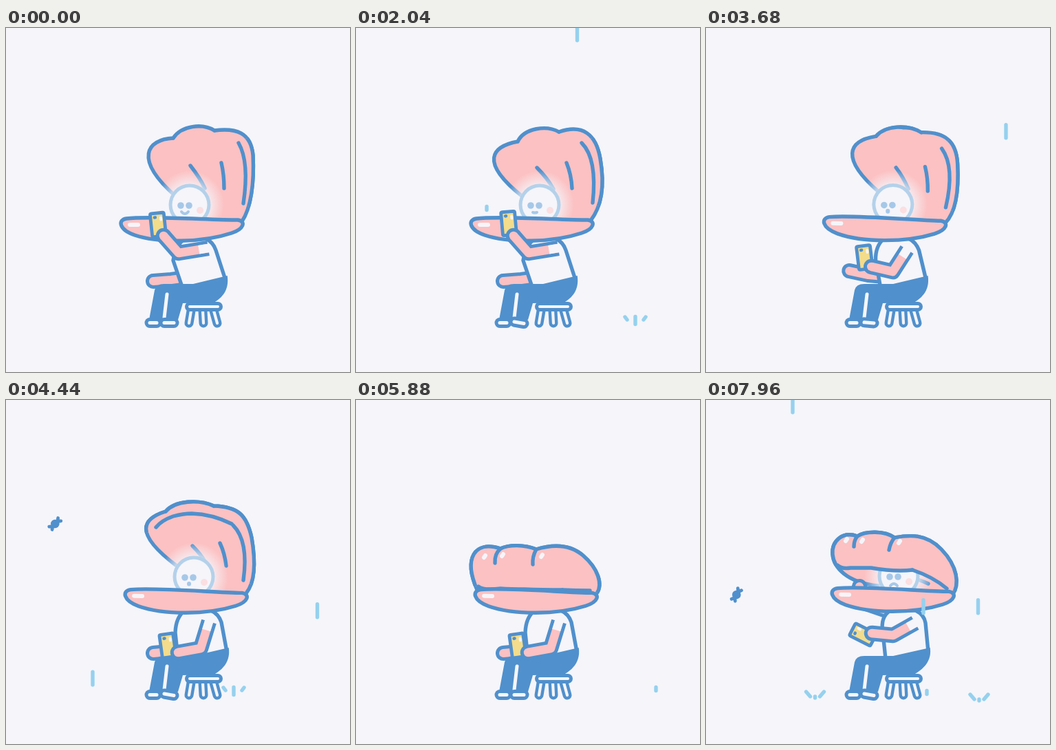
An HTML page with a canvas for the animation above (8 s loop, 500 px wide and 500 px high).

```html
<!DOCTYPE html>
<html lang="en">
<head>
<meta charset="utf-8">
<title>Clam on a stool</title>
<style>
  html, body { margin: 0; height: 100%; overflow: hidden; background: #f5f5fa; }
  canvas { display: block; width: 100vw; height: 100vh; }
</style>
</head>
<body>
<canvas id="stage" width="500" height="500"></canvas>
<script>
const ctx = document.getElementById('stage').getContext('2d');
const LOOP = 8000;
const WHITE = '#f5f5fa', BLUE = '#5090cc', PINK = '#fcc1c2', YELLOW = '#f3dc8b', RAIN = '#95d1ee';
const FACE_LINE = '#b4d1ea', FACE_DARK = '#a6c8e8';

// Poses: every value is a string whose numbers are blended between keys.
const reading = {
  outline: 'M246 244 C185 190 205 162 243 160 C255 142 285 138 303 149 C335 145 356 152 359 185 C361 225 356 262 343 281',
  rimTop: 'M190 170 Q215 135 243 140 Q270 120 300 130 Q340 125 375 145',
  rimSide: 'M338 167 Q354 195 345 255',
  folds: 'M268 200 Q282 218 289 233 M313 196 Q317 213 317 233',
  creases: 'M243 160 Q243 160 243 160 M303 149 Q303 149 303 149',
  shine: 'M205 130 L204 132 M235 125 L234 127 M300 125 L299 127',
  lower: '0 0 0', face: '267 257', mouth: 'M255 267 Q260 273 265 267', mouthWidth: '4', angry: '0',
  torso: 'M256 376 L243 338 Q247 312 262 306 L290 306 Q301 311 305 323 L319 366',
  arm: 'M294 320 L251 327 L229 302', backArm: 'M255 364 L240 366 L214 368',
  phone: '221 286 -6', tap: '0'
};
const swayed = {
  ...reading,
  outline: 'M242 245 C178 194 198 172 235 165 C245 145 277 141 295 151 C330 139 349 155 355 190 C361 225 358 258 341 280',
  rimSide: 'M328 167 Q351 190 344 254',
  folds: 'M263 203 Q278 218 287 234 M306 196 Q313 213 314 233',
  creases: 'M235 165 Q235 165 235 165 M295 151 Q295 151 295 151',
  mouth: 'M257 268 Q260 269 263 268', phone: '222 284 -5', tap: '1'
};
const lowering = {
  ...reading,
  outline: 'M252 235 C205 188 210 158 258 154 C272 137 305 138 321 150 C355 148 374 162 372 195 C371 235 364 270 347 285',
  rimSide: 'M352 170 Q369 200 351 260',
  folds: 'M280 196 Q290 212 297 232 M324 197 Q326 215 324 234',
  creases: 'M258 154 Q258 154 258 154 M321 150 Q321 150 321 150',
  lower: '3 -1 1.5', face: '271 256', mouth: 'M263 265 Q263 266 263 266', mouthWidth: '6',
  torso: 'M256 376 L247 338 Q245 318 258 306 L292 306 Q302 311 307 323 L319 366',
  arm: 'M290 322 L263 349 L233 332', backArm: 'M255 358 L236 354 L204 342',
  phone: '227 316 -6'
};
const waiting = {
  ...lowering,
  outline: 'M248 241 C183 192 200 172 232 162 C246 146 280 144 302 154 C338 155 350 168 357 200 C363 235 362 265 349 281',
  rimTop: 'M218 185 Q226 175 243 169 Q258 165 270 165 Q300 166 328 180',
  rimSide: 'M330 182 Q353 205 345 262',
  folds: 'M271 212 Q283 224 290 236 M311 208 Q318 223 320 241',
  creases: 'M232 162 Q232 162 232 162 M302 154 Q302 154 302 154',
  shine: 'M205 140 L204 142 M235 135 L234 137 M300 135 L299 137',
  lower: '6 0 1', face: '273 257', mouth: 'M266 267 Q266 267 266 267.5',
  torso: 'M250 376 L246 338 Q247 315 260 306 L298 306 Q309 311 313 323 L321 366',
  arm: 'M295 322 L283 361 L250 367', backArm: 'M250 364 L236 366 L214 368',
  phone: '235 357 -8', tap: '1'
};
const closed = {
  ...waiting,
  outline: 'M176 276 C156 230 172 204 210 216 C222 210 245 210 262 217 C285 210 310 209 330 226 C352 245 359 268 350 281',
  rimTop: 'M178 271 Q185 277 210 274 Q225 275 245 275 Q270 276 300 276',
  rimSide: 'M300 276 Q320 277 340 277',
  folds: 'M260 250 Q262 252 264 254 M305 250 Q308 252 310 254',
  creases: 'M210 216 Q201 224 202 237 M262 217 Q256 228 257 239',
  shine: 'M188 226 L186 229 M214 224 L212 227 M271 225 L269 228',
  tap: '0'
};
const spitting = {
  ...closed,
  outline: 'M254 253 C168 236 182 162 226 181 C238 170 262 169 276 181 C295 174 320 174 341 199 C362 226 371 262 358 284',
  rimTop: 'M202 208 Q208 214 228 211 Q250 219 272 209 Q300 218 318 210',
  rimSide: 'M318 210 Q350 235 351 273',
  folds: 'M255 195 Q257 197 259 199 M310 231 Q321 242 327 255',
  creases: 'M226 181 Q222 184 221 190 M276 181 Q269 185 267 191',
  shine: 'M212 183 L210 186 M232 182 L230 185 M283 179 L281 182',
  lower: '16 -2 1', face: '281 256', mouth: 'M275 267 Q275 267 275 267.5', mouthWidth: '10', angry: '1',
  torso: 'M261 376 L257 338 Q253 315 268 306 L305 306 Q317 312 319 324 L323 366',
  arm: 'M298 325 L268 310 L248 284', backArm: 'M262 325 L238 331 L207 315',
  phone: '241 277 -8', tap: '1'
};
const wary = {
  ...spitting,
  outline: 'M250 270 C158 260 176 182 220 198 C232 190 260 190 274 200 C296 196 320 194 342 217 C366 242 369 268 358 284',
  rimTop: 'M191 240 Q197 246 210 244 Q225 244 240 244 Q275 250 300 247',
  rimSide: 'M300 247 Q330 257 350 274',
  folds: 'M255 220 Q257 222 259 224 M308 261 Q317 264 323 267',
  creases: 'M220 198 Q215 204 215 213 M274 200 Q268 207 266 218',
  shine: 'M205 202 L203 205 M228 203 L226 206 M282 205 L280 208',
  face: '280 256', mouth: 'M268 270 Q273 264 278 270', mouthWidth: '4', angry: '0',
  arm: 'M304 324 L272 342 L241 339', backArm: 'M262 306 L230 295 L223 271',
  phone: '228 341 -63'
};

const keys = [
  [0, reading], [680, swayed], [1360, reading], [2040, swayed], [2300, swayed],
  [2640, lowering], [3500, lowering], [3900, waiting], [4700, waiting],
  [4900, closed], [6300, closed], [6540, spitting], [6850, spitting], [7300, wary], [LOOP, wary]
];

// Rain: x, landing time, ground height.
const drops = [
  [316, 400, 425], [277, 640, 150], [126, 820, 425],
  [331, 1100, 425], [158, 1400, 427], [406, 1960, 425], [190, 2010, 267], [321.5, 2378, 425],
  [126, 2670, 429], [396, 2810, 423], [210, 3155, 425], [436, 3900, 425], [331, 4360, 423],
  [126, 4448, 425], [452.5, 4530, 425], [406, 5110, 425], [277, 5200, 204], [59, 5250, 430],
  [372, 5250, 430], [436, 5830, 425], [126, 6430, 429], [210, 6520, 425], [60, 6763, 425],
  [406, 7200, 425], [158.5, 7790, 425], [397, 7790, 429], [321, 7930, 430],
  [316, 8055, 425], [395.5, 8055, 425], [126, 8298, 425]
];

const nums = s => s.match(/-?[\d.]+/g).map(Number);
const ease = k => (1 - Math.cos(Math.PI * k)) / 2;

function blend(a, b, k) {
  if (a === b) return a;
  const target = nums(b);
  let i = 0;
  return a.replace(/-?[\d.]+/g, n => (+n + (target[i++] - n) * k).toFixed(2));
}

function poseAt(t) {
  const i = keys.findIndex(([time]) => time > t);
  const [t0, a] = keys[i - 1], [t1, b] = keys[i];
  const k = ease((t - t0) / (t1 - t0)), pose = {};
  for (const name in a) pose[name] = blend(a[name], b[name], k);
  return pose;
}

function stroke(d, color = BLUE, width = 5.4) {
  ctx.strokeStyle = color;
  ctx.lineWidth = width;
  ctx.stroke(new Path2D(d));
}

function fill(d, color) {
  ctx.fillStyle = color;
  ctx.fill(new Path2D(d));
}

function dot(x, y, r, color) {
  ctx.fillStyle = color;
  ctx.beginPath();
  ctx.arc(x, y, r, 0, 7);
  ctx.fill();
}

function tube(d, color, outer, inner) {
  stroke(d, BLUE, outer);
  stroke(d, color, inner);
}

function local(x, y, degrees, draw) {
  ctx.save();
  ctx.translate(x, y);
  ctx.rotate(degrees * Math.PI / 180);
  draw();
  ctx.restore();
}

function clipped(d, draw) {
  ctx.save();
  ctx.clip(new Path2D(d));
  draw();
  ctx.restore();
}

function drawFace(p) {
  const [x, y] = nums(p.face);
  const glow = ctx.createRadialGradient(x, y, 25, x, y, 50);
  glow.addColorStop(0, 'rgba(245,245,250,.9)');
  glow.addColorStop(1, 'rgba(245,245,250,0)');
  dot(x, y, 50, glow);
  dot(x, y, 30.5, FACE_LINE);
  dot(x, y, 25.5, WHITE);
  dot(x + 15, y + 8, 5, '#fbdfe1');
  if (+p.angry > .5) {
    fill(`M${x - 16} ${y - 5}l10 5l-9 5z M${x + 4} ${y - 5}l-10 5l9 5z`, FACE_DARK);
  } else {
    dot(x - 13, y + 1, 4.8, FACE_DARK);
    dot(x - 1, y + 1, 4.8, FACE_DARK);
  }
  stroke(p.mouth, FACE_DARK, +p.mouthWidth);
}

function drawUpperShell(p, t) {
  const inside = `${p.outline}V292H${nums(p.face)[0]}Z`;
  fill(inside, PINK);
  clipped(inside, () => stroke(p.folds));
  stroke(p.outline);
  drawFace(p);
  if (t > 6400) drawCandy(t);
  // The front of the shell hides whatever lies above its rim.
  const cap = p.rimTop + p.rimSide.replace('M', 'L') + 'L420 300V90H100V260Z';
  clipped(cap, () => {
    fill(p.outline, PINK);
    stroke(p.outline);
  });
  clipped(inside, () => {
    stroke(p.rimTop);
    stroke(p.rimSide);
    stroke(p.creases);
    stroke(p.shine, WHITE, 6);
  });
}

function drawLowerShell(p) {
  const [dx, dy, angle] = nums(p.lower);
  local(256 + dx, 290 + dy, angle, () => {
    const shell = 'M-81 -13C-46 -17 40 -11 81 -11C93 -9 90 2 72 8C30 22 -33 23 -69 11C-92 3 -94 -11 -81 -13Z';
    fill(shell, PINK);
    stroke(shell);
    stroke('M-76 -4H-64', WHITE, 6);
  });
}

function drawPhone(p) {
  const [x, y, angle] = nums(p.phone);
  local(x, y, angle, () => {
    const body = 'M-8 -17H8Q10 -17 10 -15V15Q10 17 8 17H-8Q-10 17 -10 15V-15Q-10 -17 -8 -17Z';
    fill(body, YELLOW);
    stroke(body, BLUE, 4.8);
    stroke('M-4 -11H-3', BLUE, 4.5);
    stroke('M5 -10V-7', WHITE, 4);
  });
}

// The arm is open at the shoulder, so that the sleeve runs into the shirt.
function drawArm(p) {
  const [sx, sy, ex, ey, hx, hy] = nums(p.arm);
  ctx.lineCap = 'butt';
  for (const [color, width] of [[BLUE, 22.5], [PINK, 12.5]]) {
    stroke(p.arm, color, width);
    dot(hx, hy, width / 2, color);
  }
  const at = k => `${sx + (ex - sx) * k} ${sy + (ey - sy) * k}`;
  stroke(`M${at(-.03)}L${at(.32)}`, WHITE, 12.5);
  ctx.lineCap = 'round';
}

function drawLegs(p) {
  for (const leg of ['M269 411L266 429', 'M286 411L287 429', 'M302 411L307 429']) tube(leg, WHITE, 13, 4.2);
  tube('M267 405H308', WHITE, 14, 4);
  const hip = nums(p.torso).at(-2) + 2.7;
  fill(`M216 381Q218 372 230 372H272L${hip} 360C${hip + 3} 380 315 392 302 399L257 400L250 424H208Z`, BLUE);
  stroke('M234 387L230 421', WHITE, 5);
  tube('M209 428.5H219', WHITE, 15, 5);
  const tap = +p.tap;
  tube(`M230 ${428.5 - tap * 1.5}L244 ${428.5 + tap}`, WHITE, 15, 5);
}

function candyAt(t) {
  if (t > 4180 && t < 4880) {
    const d = t - 4440;
    return [71 + d * .335, 180 + d * d * .0003, -45 + d * .3];
  }
  if (t > 6480 && t < 6850) {
    const d = Math.max(0, t - 6600);
    return [212 - d * 1.27, 229 + d * .12, 20 - d];
  }
  if (t > 7780) {
    const d = t - 7960;
    return [44 + d * .335, 283 + d * .03, -60 + d * .3];
  }
}

function drawCandy(t) {
  const candy = candyAt(t);
  if (!candy) return;
  local(...candy, () => {
    dot(0, 0, 6.3, BLUE);
    stroke('M-5 0L-9 -3M-5 0L-9 3M5 0L9 -3M5 0L9 3', BLUE, 4.8);
  });
}

function drawDrop(t, [x, land, ground]) {
  const age = t - land;
  if (age < 0) {
    const tip = ground + age * 1.2;
    if (tip > 0) stroke(`M${x} ${tip - 21.5}V${tip - 2.5}`, RAIN);
  } else if (age < 60) {
    stroke(`M${x} ${ground - 7.5}V${ground - 2.5}`, RAIN);
  } else if (age < 140) {
    stroke(`M${x} ${ground - 5.5}v11M${x - 15} ${ground - 5}l3 4M${x + 15} ${ground - 5}l-3 4`, RAIN);
  } else if (age < 220) {
    stroke(`M${x - 13} ${ground - 1}l6 7M${x + 13} ${ground - 1}l-6 7M${x} ${ground + 6}v2`, RAIN);
  }
}

function drawScene(t) {
  const p = poseAt(t);
  ctx.fillStyle = WHITE;
  ctx.fillRect(0, 0, 500, 500);
  ctx.lineCap = ctx.lineJoin = 'round';
  const falling = drops.filter(d => t < d[1]), landed = drops.filter(d => t >= d[1]);
  landed.forEach(d => drawDrop(t, d));
  if (t < 6400) drawCandy(t);
  drawUpperShell(p, t);
  tube(p.backArm, PINK, 22, 12);
  fill(p.torso, WHITE);
  stroke(p.torso);
  drawLegs(p);
  drawLowerShell(p);
  drawPhone(p);
  drawArm(p);
  falling.forEach(d => drawDrop(t, d));
}

const start = performance.now();
function tick() {
  drawScene((performance.now() - start) % LOOP);
  requestAnimationFrame(tick);
}
tick();
</script>
</body>
</html>
```
